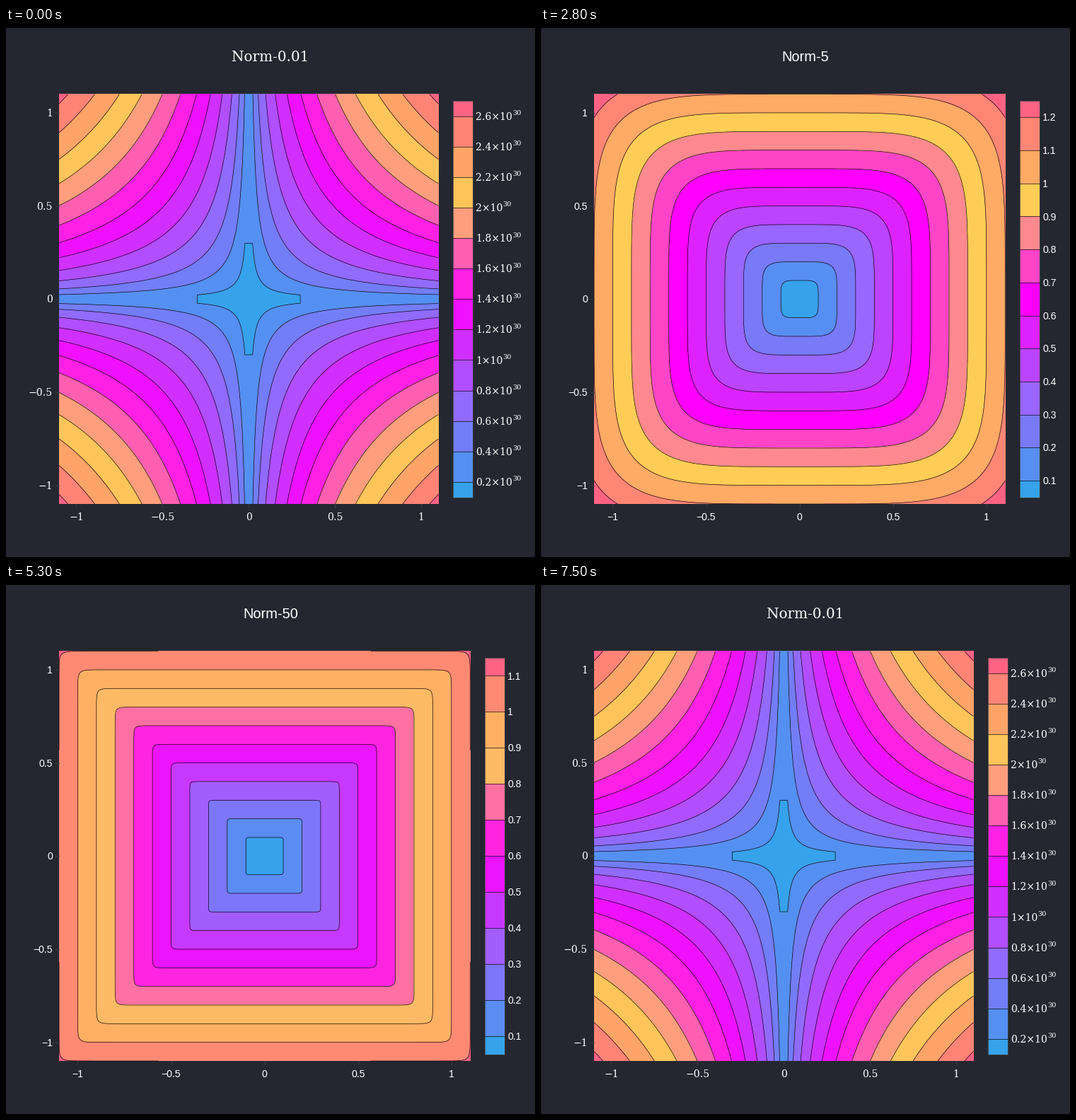
Recreate the animation shown at these times as a matplotlib script. Size 748 by 748 pixels, loop 7700 ms.

```python
import math

import matplotlib.pyplot as plt
import numpy as np
from matplotlib.animation import FuncAnimation
from matplotlib.colors import LinearSegmentedColormap
from matplotlib.patches import Rectangle

SIZE, DPI = 748, 100
PX = 72 / DPI
BACKGROUND = "#242730"
LEFT, TOP, BOTTOM = 75, 93.6, 673
BAR_TOP, BAR_BOTTOM, BAR_WIDTH = 103, 663.5, 27.7
LIMIT = 1.1
SAMPLES = np.linspace(-LIMIT, LIMIT, 50)
HALF_CELL = LIMIT / 49
FINE = np.unique(np.r_[np.linspace(-LIMIT, LIMIT, 241), -HALF_CELL, HALF_CELL])
TICK_SIZE, TITLE_SIZE = 14, 20
LINE = 0.65 * PX

COLORS = LinearSegmentedColormap.from_list(
    "norms", ["#36a2eb", "#9966ff", "#ff00ff", "#ffcd56", "#ff6384"], N=4097)

ORDERS = [0.01, 0.1, 0.25, 0.5, 0.75, 1, 1.25, 1.5, 1.75, 2, 2.5,
          3, 4, 5, 6, 7, 8, 9, 10, 20, 30, 40, 50, 100, 1000, 10000, math.inf]

# How long each page stays, in ticks of 50 ms, up to infinity and back.
TICK = 50
RISE = [10, 5, 2, 3, 4, 6, 4, 3, 4, 6, 4, 3] + [2] * 12 + [3, 5, 10]
FALL = [5, 3] + [2] * 23 + [4]
LAST = len(ORDERS) - 1
TIMELINE = np.repeat([*range(LAST + 1), *range(LAST - 1, -1, -1)], RISE + FALL)


def norm_surface(p):
    """Axis samples and the p-norm over the square."""
    if p == math.inf:
        x, y = np.meshgrid(FINE, FINE)
        return FINE, np.maximum(abs(x), abs(y)) - 0.97
    axis = SAMPLES if p >= 1000 else FINE
    x, y = np.meshgrid(*[np.maximum(abs(axis), HALF_CELL)] * 2)
    with np.errstate(over="ignore", under="ignore"):
        z = (x ** p + y ** p) ** (1 / p)
    z = np.minimum(z, z[np.isfinite(z)].max())
    return axis, z * (1 if isinstance(p, int) else 6 / math.pi)


def nice_levels(z):
    rough = (z.max() - z.min()) / 15
    magnitude = 10.0 ** math.floor(math.log10(rough))
    step = next(m * magnitude for m in (2, 5, 10) if m * magnitude >= rough)
    return step * np.arange(1, math.floor(z.max() / step - 1e-9) + 1)


def label_width(text, serif):
    digit, dot, times = (0.636, 0.318, 0.838) if serif else (0.556, 0.278, 0.584)
    return TICK_SIZE * sum({".": dot, "×": times}.get(c, digit) for c in text)


def build_page(fig, p):
    ax = fig.add_axes([0, 0, 1, 1])
    serif = isinstance(p, float) and p != math.inf
    family = "DejaVu Serif" if serif else "Liberation Sans"

    def write(x, y, text, size=TICK_SIZE, ha="center"):
        ax.text(x, y + 0.36 * size, text, size=size * PX, color="white",
                family=family, ha=ha, va="baseline")

    axis, z = norm_surface(p)
    endless = p == math.inf
    levels = np.array([0.0]) if endless else nice_levels(z)
    power = "30" if levels[-1] > 1e20 else ""
    scale, suffix = (1e30, "×10") if power else (1, "")
    labels = [f"{v / scale:.10g}{suffix}" for v in levels]
    widths = [label_width(text, serif) for text in labels]
    widest = max(widths) + 0.7 * label_width(power, serif)
    right = 675.7 - widest

    def px(v):
        return (LEFT + right) / 2 + v * (right - LEFT) / (2 * LIMIT)

    def py(v):
        return (TOP + BOTTOM) / 2 - v * (BOTTOM - TOP) / (2 * LIMIT)

    # Filled contours
    count = len(levels)
    colors = [COLORS(i / count) for i in range(count + 1)]
    reach = float(abs(z).max()) + 1
    bounds = [-reach, *levels, 2 * reach]
    ax.contourf(px(axis), py(axis), z, levels=bounds, colors=colors)
    if endless:
        x0, x1, y0, y1 = px(-0.97), px(0.97), py(0.97), py(-0.97)
        ax.plot([x0, x0], [y0, y1], color="#e6dcee", lw=PX)
        ax.plot([x1, x1], [y0, y1], color="#e6dcee", lw=PX)
        ax.plot([x0, x1], [y1, y1], color="#8f86b8", lw=PX)
    else:
        ax.contour(px(axis), py(axis), z, levels=levels, colors="black",
                   linewidths=LINE)

    # Axis ticks
    for v in (-1, -0.5, 0, 0.5, 1):
        text = f"{v:g}".replace("-", "\u2212")
        ax.plot([px(v)] * 2, [BOTTOM, BOTTOM + 5], color="#383c47", lw=PX)
        ax.plot([LEFT - 5, LEFT], [py(v)] * 2, color="#383c47", lw=PX)
        write(px(v), 691, text)
        write(66, py(v), text, ha="right")

    # Colour bar: half a step of room at both ends
    bar = right + 20.8
    step = (BAR_BOTTOM - BAR_TOP) / count
    marks = [BAR_BOTTOM - (i + 0.5) * step for i in range(count)]
    edges = [BAR_BOTTOM, *marks, BAR_TOP]
    for low, high, color in zip(edges, edges[1:], colors):
        ax.add_patch(Rectangle((bar, high), BAR_WIDTH, low - high, fc=color, lw=0))
    for y, text, width in zip(marks, labels, widths):
        ax.plot([bar, bar + BAR_WIDTH], [y, y], color="black", lw=LINE)
        write(right + 52.8, y, text, ha="left")
        if power:
            write(right + 52.8 + width, y - 5, power, 0.7 * TICK_SIZE, "left")
    ax.add_patch(Rectangle((bar, BAR_TOP), BAR_WIDTH, BAR_BOTTOM - BAR_TOP,
                           fill=False, ec="#444444", lw=0.8 * PX))

    # Title
    if endless:
        write(320, 40, "Norm-", TITLE_SIZE, "left")
        t = np.linspace(0, 2 * math.pi, 121)
        ax.plot(396.5 + 15.5 * np.cos(t), 41.2 + 8 * np.sin(2 * t),
                color="white", lw=5 * PX)
    else:
        write(374, 40, f"Norm-{p}", TITLE_SIZE)

    ax.set(xlim=(0, SIZE), ylim=(SIZE, 0))
    ax.axis("off")
    return ax


fig = plt.figure(figsize=(SIZE / DPI, SIZE / DPI), dpi=DPI, facecolor=BACKGROUND)
pages = [build_page(fig, p) for p in ORDERS]


def show(frame):
    for i, page in enumerate(pages):
        page.set_visible(i == TIMELINE[frame])
    return pages


animation = FuncAnimation(fig, show, frames=len(TIMELINE), interval=TICK,
                          init_func=lambda: show(0), repeat=True, repeat_delay=0)
plt.show()
```
